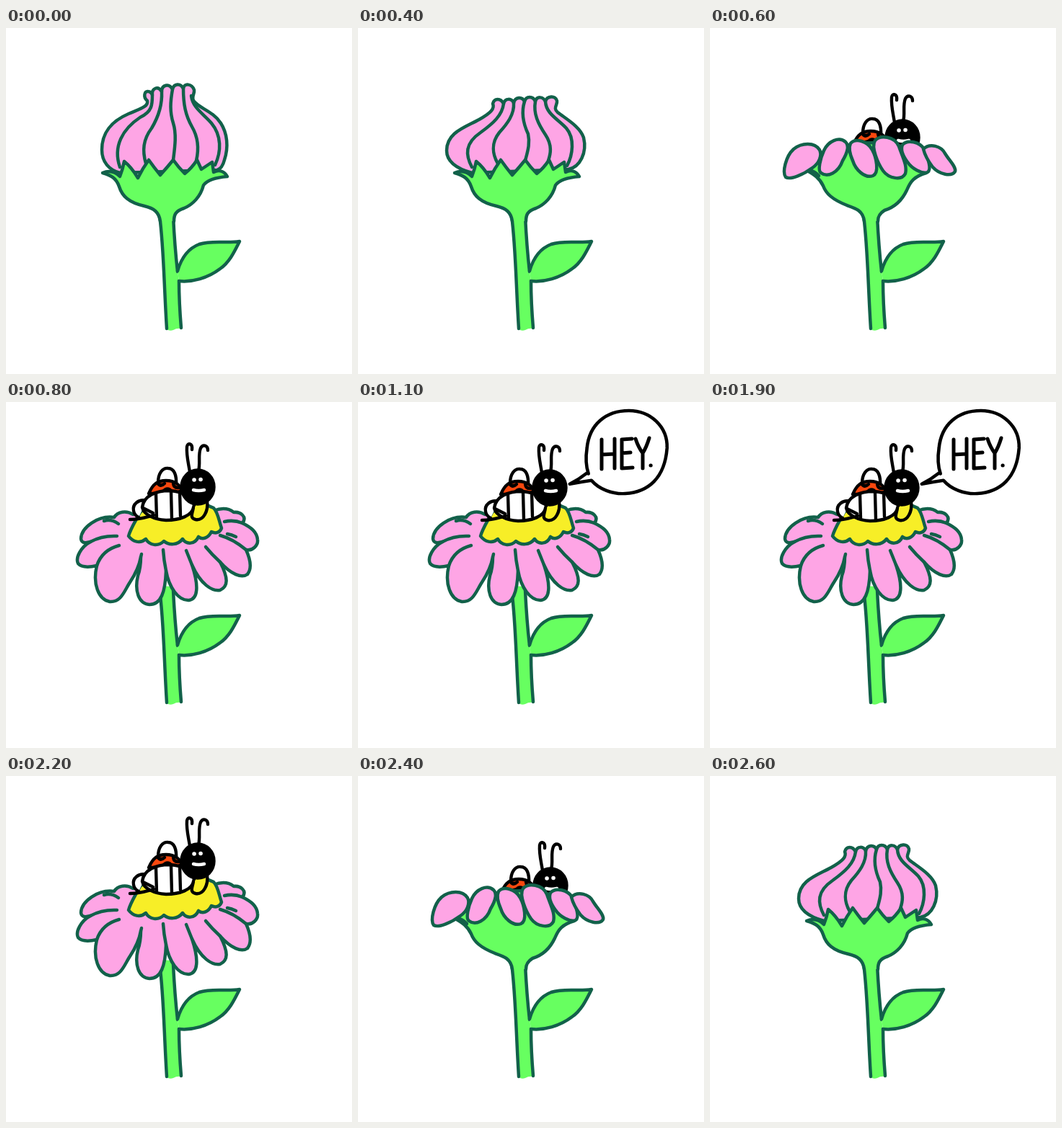
Write an HTML page that moves like this. It is 480x480 px and loops after 2700 ms.

```html
<!DOCTYPE html>
<html lang="en">
<head>
<meta charset="utf-8">
<title>Flower and bug</title>
<style>
  html, body { margin: 0; width: 100%; height: 100%; overflow: hidden; background: #fff; }
  svg { display: block; width: 100%; height: 100%; }
  path, ellipse { stroke-linecap: round; stroke-linejoin: round; }
  .plant { stroke: #12614a; stroke-width: 4.5; }
  .green { fill: #67ff60; }
  .pink { fill: #fea5e5; }
  .yellow { fill: #f7ee27; }
  .line { fill: none; }
  .ink { stroke: #000; stroke-width: 4.4; }
  .white { fill: #fff; }
  .scene { display: none; }
</style>
</head>
<body>
<svg viewBox="0 0 480 480">
  <defs>
    <path id="sepals" class="green" d="M214 268 C212 255 205 250 192 247 C170 242 161 233 157 220 C153 208 145 204 134 201 C143 197 151 199 158 206 Q162 196 164 185 Q174 193 183 208 Q190 194 198 183 Q205 193 214 204 Q223 194 232 183 Q239 193 248 202 Q258 194 265 183 L271 196 L286 186 L288 200 C296 196 303 199 307 206 C295 207 280 210 274 218 C270 234 259 245 247 250 C235 254 233 259 233 268"/>

    <g id="bug" class="ink">
      <path class="line" d="M255 97 C253 84 250 74 251 62 C252 56 259 57 258 66 M267 96 C270 84 266 74 270 64 C273 58 280 60 280 67"/>
      <path class="white" d="M211 112 C211 99 217 91 225 92 C233 92 237 101 236 115"/>
      <path class="white" d="M195 137 C184 134 175 142 177 151 Q178 157 184 160"/>
      <path fill="#fa480e" d="M198 127 C204 113 211 109 222 109 C234 109 243 115 245 127Z"/>
      <path d="M210 112 Q214 119 220 113 M232 113 Q233 120 240 119 M218 124 Q224 117 230 124Z"/>
      <path class="white" d="M189 146 C191 130 208 123 227 123 C247 124 261 133 261 145 C258 158 241 164 222 164 C205 163 191 156 189 146Z"/>
      <path class="line" d="M208 127 L209 161 M229 125 L230 162 M241 124 L242 158 M190 147 L204 154 M172 163 C186 163 194 160 205 157"/>
      <path class="yellow" d="M260 146 C259 154 254 161 263 163 C274 165 281 151 279 137"/>
      <ellipse cx="266" cy="118" rx="22.5" ry="23.5"/>
      <g stroke="#fff" fill="none">
        <path stroke-width="5.5" d="M261 108 h.1 M270 107.500 h.1"/>
        <path stroke-width="4.5" d="M260 122 Q267 124 275 122"/>
      </g>
    </g>

    <g id="bloom" class="plant">
      <path class="pink" d="M176 156 C167 150 155 152 150 160 C128 157 104 174 104 190 C105 196 110 196 117 194 C104 201 96 216 100 224 C105 230 117 229 126 227 C120 252 128 274 144 277 C160 278 164 262 172 250 Q184 232 187 215 Q187 230 183 241 C178 262 184 280 199 281 C215 281 221 264 222 234 C226 257 239 276 254 275 C266 273 268 256 258 226 C270 253 286 263 297 261 C308 256 309 245 297 222 C312 239 327 245 335 239 C342 230 338 216 333 205 C342 207 350 199 349 191 C348 180 340 174 328 168 C335 159 325 152 316 153 C307 146 298 147 288 151Z"/>
      <path class="line" d="M156 169 Q146 162 136 165 M154 186 Q133 185 117 194 M157 199 C142 203 131 212 126 227 M188 211 L187 215 M218 205 Q219 220 222 234 M250 206 L258 226 M277 201 Q286 212 297 222 M297 185 Q315 190 333 205 M303 166 Q316 163 328 168 M307 183 Q313 184 319 187"/>
      <path class="yellow" d="M170 186 C173 175 180 165 186 153 C208 135 264 134 288 147 C294 153 295 163 299 175 C297 181 291 183 285 180 C281 188 273 192 267 187 C262 198 250 198 245 190 C238 199 226 199 219 193 C211 201 199 199 194 190 C186 197 176 194 170 186Z"/>
    </g>

    <path id="bubble" class="ink white" d="M320 96 Q309 105 297 111 Q312 108 326 106 C336 118 354 125 371 124 C402 122 424 103 427 62 C428 33 405 11 376 11 C345 11 323 30 320 62 Q317 82 322 97"/>
    <path id="greeting" class="ink line" role="img" aria-label="HEY." style="stroke-width: 5" d="M338 52 V93 M356 51 V92 M338 73 L356 72 M366 52 V92 M366 52 L380 51 M366 71 L378 70 M366 92 L381 91 M385 51 Q389 63 395 71 M404 50 Q400 63 395 71 V92 M406 88 h.2"/>
  </defs>

  <g class="plant">
    <path class="green" stroke="none" d="M213 255 C217 300 220 355 223 418 Q227 421 232 419 Q237 416 243 417 L240 351 L238 337 Q234 295 232 256Z"/>
    <path class="line" d="M213 260 C219 305 219 355 223 417 M232 261 Q234 303 238 338 M240 351 Q240 380 243 416"/>
    <path class="green" d="M238 337 C243 320 252 306 268 300 C286 294 306 299 324 296 C317 310 310 325 297 334 C280 347 258 353 240 351"/>
  </g>

  <g class="scene plant" id="closed">
    <path class="pink" d="M158 201 C143 197 133 186 133 169 C133 144 147 129 170 119 C186 112 198 109 196 101 C190 96 192 87 197 88 Q201 88 203 93 C202 83 211 80 216 88 C216 79 226 76 231 85 C233 77 242 76 246 84 C247 76 258 77 261 86 C262 92 256 96 261 102 C268 111 288 116 298 132 C307 146 309 165 303 183 Q300 195 293 197Z"/>
    <path class="line" d="M203 93 C203 106 203 116 186 124 C162 140 148 164 158 193 M216 88 C217 108 211 124 202 139 C190 155 189 170 194 188 M231 85 C228 102 227 116 232 132 C237 148 234 167 232 183 M246 84 C246 106 249 121 258 137 C268 154 267 171 264 184 M257 94 C259 111 274 119 285 132 C299 149 299 171 290 190"/>
    <use href="#sepals"/>
  </g>

  <g class="scene plant" id="loosened">
    <path class="pink" d="M158 201 C140 196 123 187 123 170 C123 145 148 138 168 127 C184 118 190 112 187 105 C189 97 198 97 202 105 C204 97 213 97 216 104 C218 95 228 95 231 102 C233 94 243 94 246 102 C248 94 257 95 260 102 C262 94 274 93 276 101 C277 107 270 111 277 117 C290 127 308 137 313 152 C318 173 308 193 292 196Z"/>
    <path class="line" d="M202 105 C200 121 188 132 170 145 C148 160 149 176 158 193 M216 104 C217 120 207 133 196 145 C184 160 187 176 194 188 M231 102 C226 118 229 132 236 147 C239 161 235 172 232 184 M246 102 C243 119 250 133 260 148 C270 163 267 175 264 184 M260 102 C261 119 277 126 289 139 C301 153 298 176 290 191"/>
    <use href="#sepals"/>
  </g>

  <g class="scene plant" id="opening">
    <path class="pink" d="M158 203 C132 201 111 188 113 169 C117 148 145 144 162 129 C170 119 183 122 187 130 C192 119 204 118 211 128 C216 117 230 117 235 127 C240 117 254 118 259 128 C265 118 279 120 282 130 C291 123 301 125 304 136 C320 147 331 162 328 177 C324 194 306 200 287 200Z"/>
    <path class="line" d="M187 130 C181 146 154 157 149 173 Q149 188 158 198 M211 128 C207 145 185 156 188 175 L195 190 M235 127 C228 145 241 162 232 186 M259 128 C257 146 273 160 266 186 M282 130 C285 146 304 156 302 175 Q300 188 288 194"/>
    <use href="#sepals"/>
  </g>

  <g class="scene plant" id="cup">
    <use href="#bug" x="1" y="34"/>
    <path class="green" d="M214 268 C212 253 202 250 190 246 C170 238 161 230 157 219 C152 208 144 203 135 198 L150 175 Q222 145 292 172 L300 201 C283 206 278 213 273 225 C266 240 255 249 242 253 C234 258 233 263 233 268"/>
    <path class="line" d="M135 196 Q146 199 151 205"/>
    <g class="pink">
      <path d="M152 169 C145 158 127 159 116 168 C105 178 100 200 105 207 C112 211 130 203 142 194 C151 188 156 177 152 169Z"/>
      <path d="M188 158 C179 150 164 157 158 170 C153 181 149 198 154 201 C163 208 178 201 184 184 C190 174 194 164 188 158Z"/>
      <path d="M195 160 C202 152 219 157 225 169 C231 180 235 201 226 205 C215 209 202 197 198 184 Q191 168 195 160Z"/>
      <path d="M229 156 C236 148 256 150 262 164 C267 179 274 191 271 202 C266 212 248 209 240 198 C233 188 223 165 229 156Z"/>
      <path d="M267 162 C274 154 291 158 297 168 C302 180 308 196 302 200 C294 203 280 195 274 186 Q263 171 267 162Z"/>
      <path d="M296 168 C305 159 321 164 326 174 C332 184 342 193 340 199 C335 207 318 203 309 193 Q299 180 296 168Z"/>
    </g>
  </g>

  <g class="scene" id="tilting">
    <use href="#sepals" class="plant"/>
    <use href="#bloom" transform="translate(0 43) scale(1 .74)"/>
    <use href="#bug" y="12"/>
  </g>

  <g class="scene" id="open">
    <use href="#bloom"/>
    <use href="#bug"/>
  </g>

  <g class="scene" id="talking">
    <use href="#bloom"/>
    <use href="#bug" y="1"/>
    <use href="#bubble" id="balloon"/>
    <use href="#greeting"/>
  </g>
</svg>
<script>
  const STEP = 100, STEPS = 27;
  const unfolding = ["closed", "loosened", "opening", "cup", "tilting", "open"];
  const scenes = document.querySelectorAll(".scene");
  const balloon = document.getElementById("balloon");

  function sceneAt(step) {
    if (step >= 10 && step < 22) return "talking";
    const stage = step < 10 ? step - 3 : STEPS - step;
    return unfolding[Math.max(0, Math.min(stage, 5))];
  }

  function draw() {
    const step = Math.floor(performance.now() / STEP) % STEPS;
    const current = sceneAt(step);
    for (const scene of scenes) scene.style.display = scene.id === current ? "inline" : "none";
    // The speech bubble wobbles on every other step.
    balloon.setAttribute("transform", step % 2 ? "translate(-14.5 .8) scale(1.038 1.018)" : "");
    requestAnimationFrame(draw);
  }
  draw();
</script>
</body>
</html>
```
